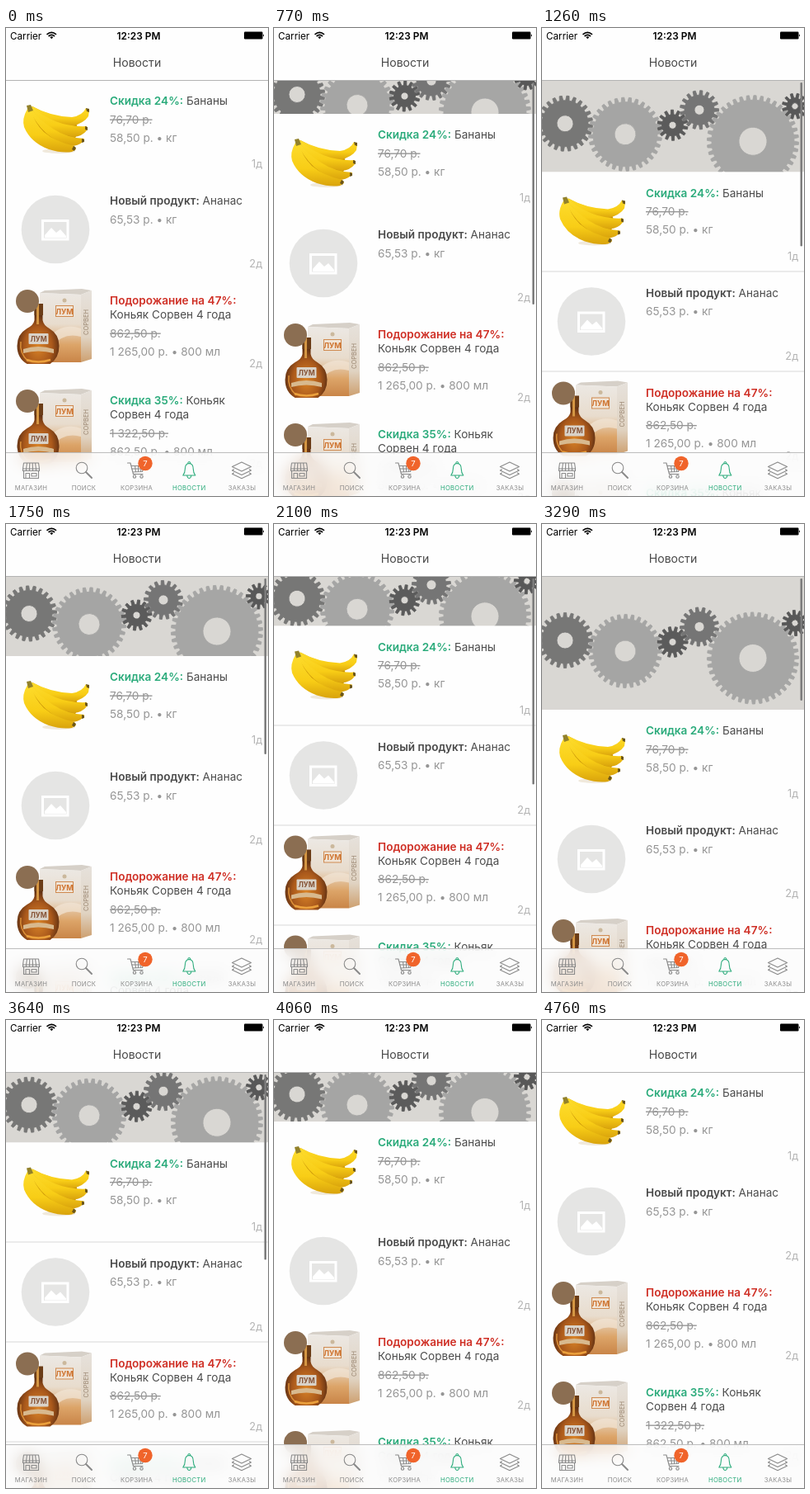
Write an HTML page that moves like this. It is 318 px wide and 567 px high and loops after 5180 ms.

```html
<!DOCTYPE html>
<html lang="ru">
<head>
<meta charset="utf-8">
<title>Новости</title>
<style>
  html, body { margin: 0; width: 100%; height: 100%; overflow: hidden; background: #fefefe; }
  #stage { position: relative; width: 318px; height: 567px; overflow: hidden; background: #fefefe; }
  svg { position: absolute; left: 0; top: 0; }
  svg text { font-family: Inter, Roboto, sans-serif; }
  #tabs {
    position: absolute; left: 0; top: 515px; width: 318px; height: 52px;
    background: rgba(252, 252, 252, .8);
    -webkit-backdrop-filter: blur(9px); backdrop-filter: blur(9px);
  }
  .line { font-size: 13.6px; fill: #4c4c4c; }
  .head { font-weight: 600; }
  .price { font-size: 13.65px; fill: #959595; }
  .old { text-decoration: line-through; }
  .age { font-size: 12.8px; fill: #b4b4b4; text-anchor: end; }
  .icon { fill: none; stroke: #8a8a8a; stroke-width: 1.1; stroke-linejoin: round; stroke-linecap: round; }
  .tab { font-size: 7.7px; letter-spacing: .25px; fill: #8c8c8c; text-anchor: middle; }
  .on { stroke: #2bab7b; }
  .tab.on { stroke: none; fill: #2bab7b; }
</style>
</head>
<body>
<div id="stage">
  <svg width="318" height="567" viewBox="0 0 318 567">
    <defs>
      <clipPath id="pullClip"><rect id="pullArea" y="63" width="318" height="0"/></clipPath>
      <linearGradient id="carton" x1="0" y1="0" x2="0" y2="1">
        <stop offset="0" stop-color="#ece8e3"/><stop offset=".45" stop-color="#e8dccd"/>
        <stop offset=".75" stop-color="#dca468"/><stop offset="1" stop-color="#c98548"/>
      </linearGradient>
      <linearGradient id="side" x1="0" y1="0" x2="0" y2="1">
        <stop offset="0" stop-color="#e6e1db"/><stop offset=".65" stop-color="#e0d3c2"/><stop offset="1" stop-color="#cda070"/>
      </linearGradient>
      <radialGradient id="amber" cx=".5" cy=".7" r=".6">
        <stop offset="0" stop-color="#d98428"/><stop offset=".55" stop-color="#a9581b"/><stop offset="1" stop-color="#42200f"/>
      </radialGradient>
      <linearGradient id="peel" x1="0" y1="0" x2="0" y2="1">
        <stop offset="0" stop-color="#fddc2c"/><stop offset=".6" stop-color="#f8cd16"/><stop offset="1" stop-color="#d9a30c"/>
      </linearGradient>

      <g id="bananas">
        <ellipse cx="64" cy="85" rx="20" ry="3" fill="#f0e9dc"/>
        <path d="M29 33Q26 56 40 70L78 80L88 62L84 46Q54 44 32 31Z" fill="#c99408"/>
        <g fill="url(#peel)">
          <path d="M30 32Q50 52 80 55Q95 51 100 43L101 36L97 33Q93 42 80 44Q54 43 32 31Z"/>
          <path d="M30 33Q50 62 82 68Q93 67 98 60L98 55Q78 56 60 49Q42 41 32 33Z"/>
          <path d="M28 34Q44 70 78 79Q88 79 93 74L95 70Q74 69 57 58Q40 47 31 34Z"/>
          <path d="M26 34Q19 46 22 56Q30 75 52 83Q68 88 80 86L85 83L83 79Q60 74 46 62Q34 50 31 36Z"/>
        </g>
        <path d="M25 30L30 29L33 36L27 38Z" fill="#92812a"/>
        <path d="M97 33l4 1v4l-3-1zM96 55l3 1v4l-3-1zM92 70l3 1v3l-3 1zM82 79l3 2l-2 4l-3-2z" fill="#6b561b"/>
      </g>

      <g id="blank">
        <circle cx="60" cy="59" r="41.3" fill="#e5e5e4"/>
        <rect x="44.5" y="48.5" width="30.5" height="22.5" fill="none" stroke="#fff" stroke-width="3"/>
        <path d="M47 69v-3l8-9l6 6l5-4l7 8v2z" fill="#fff"/>
      </g>

      <g id="cognac">
        <path d="M41 15L47 12L92 10L104 12L91 17Z" fill="#d6d0c8"/>
        <path d="M41 15L91 17V99H41Z" fill="url(#carton)"/>
        <path d="M91 17L104 12V95L91 99Z" fill="url(#side)"/>
        <path d="M50 72Q66 50 91 58V68Q70 62 56 80Z" fill="#f3e6d6" opacity=".7"/>
        <circle cx="71" cy="24" r="2.500" fill="#cbb89c"/>
        <rect x="60.500" y="30.500" width="21" height="13" fill="#f0e4d6" stroke="#cf8a50"/>
        <text x="71" y="40.500" text-anchor="middle" font-size="9" font-weight="700" fill="#cf7430">ЛУМ</text>
        <text transform="translate(100 66) rotate(-90)" font-size="7.500" fill="#998570">СОРВЕН</text>
        <path d="M34.500 29h10v19q1 6 8 10q12 7 12 21q0 15-11 22H25.500q-12-7-12-22q0-14 12-21q8-4 9-10z" fill="url(#amber)"/>
        <path d="M34.500 28h10.500v14h-10.500z" fill="#6b3d18"/>
        <path d="M37 28h3v25h-3z" fill="#d49643"/>
        <path d="M18 74Q16 88 27 98" fill="none" stroke="#dc9038" stroke-width="1.500"/>
        <rect x="27.500" y="64" width="24" height="13" rx="1" fill="#d9d2c8"/>
        <text x="39.500" y="73.500" text-anchor="middle" font-size="8.500" font-weight="700" fill="#865336">ЛУМ</text>
        <path d="M21 83Q39 77 58 83V88Q39 83 21 88Z" fill="#d8b98e"/>
        <path d="M25 96Q39 101 54 96" fill="none" stroke="#eba03c" stroke-width="2.500"/>
        <circle cx="26" cy="25" r="14" fill="#8b6e52"/>
      </g>
    </defs>

    <g clip-path="url(#pullClip)">
      <rect y="63" width="318" height="260" fill="#d9d7d3"/>
      <g id="gears"></g>
    </g>
    <g id="list"></g>
    <rect id="thumb" x="313.500" y="66" width="2.500" height="300" rx="1.250" fill="#7c7c7c"/>
  </svg>

  <div id="tabs"></div>

  <svg width="318" height="567" viewBox="0 0 318 567">
    <rect width="318" height="63" fill="#fefefe"/>
    <rect y="63" width="318" height="1" fill="#b3b3b3"/>
    <text x="5" y="13.500" font-size="11.700">Carrier</text>
    <g fill="none" stroke="#000" stroke-width="1.700">
      <path d="M49.500 7.800Q55.300 2.800 61 7.800M51.600 10Q55.300 6.900 59 10"/>
      <path d="M53.300 11.100Q55.300 9.600 57.300 11.100L55.300 13.200Z" fill="#000" stroke="none"/>
    </g>
    <text x="161" y="13.500" font-size="11.900" font-weight="600" text-anchor="middle">12:23 PM</text>
    <rect x="289" y="4.500" width="22.500" height="9" rx="1.200"/>
    <path d="M312 7.500Q314 9 312 10.500Z"/>
    <text x="159" y="47" font-size="14.100" fill="#4a4a4a" text-anchor="middle">Новости</text>

    <rect y="514" width="318" height="1" fill="#bdbdbd"/>
    <g class="icon">
      <path d="M21.500 527H39.500L40.500 534H20.500ZM20.500 534v2.500h4v-2.500v2.500h4v-2.500v2.500h4v-2.500v2.500h4v-2.500v2.500h4v-2.500M25.500 527l-1 7M28.800 527l-.3 7M32.200 527l.3 7M35.500 527l1 7M21.500 536.500V545.500H39.500V536.500M24 545.500v-6h4.500v6M31 539.500h6v3.500h-6z"/>
      <circle cx="92" cy="533" r="6.800"/>
      <path d="M97 538L104 545" stroke-width="2"/>
      <path d="M147.500 527H151L154.500 540.500H166M152 530.500H168L165.500 537.500L154 538M156.500 530.500l1 7M160.500 530.500v7M164.500 530.500l-1 7M152.500 534H166.500"/>
      <circle cx="156" cy="543.500" r="1.700"/><circle cx="164.500" cy="543.500" r="1.700"/>
      <path class="on" d="M222.300 527.500q-5 .3-5 7q0 4.500-2.500 7.500H229.800q-2.500-3-2.500-7.500q0-6.700-5-7zM220.800 527.500q0-2 1.500-2t1.500 2M219.800 542.500q.5 3 2.500 3t2.500-3"/>
      <path d="M286 526L297.500 531.500L286 537L274.500 531.500ZM276.500 534.800L274.500 536L286 541.500L297.500 536L295.500 534.800M276.500 539L274.500 540.200L286 545.700L297.500 540.200L295.500 539"/>
    </g>
    <circle cx="169" cy="527.500" r="8.700" fill="#f0642b"/>
    <text x="169" y="531" font-size="9.500" fill="#fff" text-anchor="middle">7</text>
    <text class="tab" x="30.500" y="559.500">МАГАЗИН</text>
    <text class="tab" x="94.500" y="559.500">ПОИСК</text>
    <text class="tab" x="158.500" y="559.500">КОРЗИНА</text>
    <text class="tab on" x="222.300" y="559.500">НОВОСТИ</text>
    <text class="tab" x="286.500" y="559.500">ЗАКАЗЫ</text>
  </svg>
</div>

<script>
const LOOP = 5180, STEP = 70, TOP = 63, ROW = 121;
const GREEN = '#2bab7b', RED = '#cf2f25', DARK = '#4a4a4a';
const $ = id => document.getElementById(id);

const news = [
  { pic: 'bananas', head: 'Скидка 24%:', color: GREEN, text: 'Бананы', old: '76,70 р.', price: '58,50 р. • кг', age: '1д' },
  { pic: 'blank', head: 'Новый продукт:', color: DARK, text: 'Ананас', price: '65,53 р. • кг', age: '2д' },
  { pic: 'cognac', head: 'Подорожание на 47%:', color: RED, text: '', more: 'Коньяк Сорвен 4 года', old: '862,50 р.', price: '1 265,00 р. • 800 мл', age: '2д' },
  { pic: 'cognac', head: 'Скидка 35%:', color: GREEN, text: 'Коньяк', more: 'Сорвен 4 года', old: '1 322,50 р.', price: '862,50 р. • 800 мл', age: '2д' }
];

function rowMarkup(item, i) {
  let y = 29;
  const line = (cls, s) => `<text class="${cls}" x="126" y="${y}">${s}</text>`;
  let out = `<use href="#${item.pic}"/>` +
    line('line', `<tspan class="head" fill="${item.color}">${item.head}</tspan> ${item.text}`);
  if (item.more) { y += 17; out += line('line', item.more); }
  y += 22.5;
  if (item.old) { out += line('price old', item.old); y += 22; }
  out += line('price', item.price);
  out += `<text class="age" x="311" y="105">${item.age}</text>`;
  return `<g transform="translate(0 ${64 + i * ROW})">${out}</g>`;
}

const separators = news.map((_, i) =>
  `<rect y="${183 + i * ROW}" width="318" height="1" fill="#dadada"/>`).join('');
$('list').innerHTML = `<rect y="${TOP}" width="318" height="520" fill="#fefefe"/>` +
  news.map(rowMarkup).join('') + `<g id="seps">${separators}</g>`;

// x, y, outer radius, teeth, hole radius, colour
const gears = [
  [28, 60, 34, 24, 10, '#777776'],
  [101, 73, 45, 32, 13, '#a5a5a4'],
  [158.5, 62, 19, 14, 4.5, '#5b5b5b'],
  [191, 43.5, 24, 17, 6, '#757575'],
  [256, 81.5, 56, 40, 17, '#a6a6a5'],
  [307, 39, 16, 12, 4, '#585858']
];

function gearPath(r, teeth, hole) {
  const pitch = 2 * Math.PI / teeth, pts = [];
  for (let i = 0; i < teeth; i++) {
    for (const [k, rad] of [[-.3, r - 6], [-.18, r - .4], [.18, r - .4], [.3, r - 6]]) {
      const a = (i + k) * pitch;
      pts.push((rad * Math.cos(a)).toFixed(2) + ' ' + (rad * Math.sin(a)).toFixed(2));
    }
  }
  return `M${pts.join('L')}ZM${hole} 0A${hole} ${hole} 0 1 0 ${-hole} 0A${hole} ${hole} 0 1 0 ${hole} 0Z`;
}

$('gears').innerHTML = gears.map(([, , r, n, hole, c]) =>
  `<path d="${gearPath(r, n, hole)}" fill="${c}" stroke="${c}" stroke-width=".8" stroke-linejoin="round" fill-rule="evenodd"/>`).join('');
const wheels = [...$('gears').children];

const inOut = p => .5 - .5 * Math.cos(Math.PI * p);
const outSine = p => Math.sin(Math.PI * p / 2);
const outQuad = p => 1 - (1 - p) ** 2;
const outCubic = p => 1 - (1 - p) ** 3;
const drag = p => (inOut(p) + outSine(p)) / 2;

// start, end, from, to, easing
const pulls = [
  [630, 1050, 0, 109, drag],
  [1190, 1400, 109, 113.5, outQuad],
  [1540, 2100, 113.5, 60.5, inOut],
  [2310, 3430, 60.5, 165, drag],
  [3430, 3990, 165, 60, outCubic],
  [4480, 4760, 60, 0, inOut]
];

function pullAt(t) {
  let value = 0;
  for (const [start, end, from, to, ease] of pulls) {
    if (t < start) break;
    value = from + (to - from) * ease(Math.min(1, (t - start) / (end - start)));
  }
  return Math.round(value * 2) / 2;
}

function turnGears(angle, pull) {
  gears.forEach(([x, y, , n], i) => {
    if (i) {
      // a tooth of the previous wheel meets a gap of this one
      const [px, py, , pn] = gears[i - 1];
      const dir = Math.atan2(y - py, x - px);
      angle = dir + Math.PI - (Math.PI - pn * (dir - angle)) / n;
    }
    wheels[i].setAttribute('transform',
      `translate(${x} ${y + pull / 2}) rotate(${angle * 180 / Math.PI})`);
  });
}

function draw(time) {
  const t = Math.floor(time % LOOP / STEP) * STEP;
  const pull = pullAt(t);
  const spin = Math.max(0, t - 3430) * .0025;
  $('pullArea').setAttribute('height', pull);
  $('list').setAttribute('transform', `translate(0 ${pull})`);
  // hairlines only land on the pixel grid at half offsets
  $('seps').setAttribute('opacity', pull % 1 ? 1 : 0);
  $('thumb').setAttribute('height', 310 - pull);
  $('thumb').setAttribute('opacity', t < 700 ? 0 : Math.max(0, Math.min(1, (3990 - t) / 280)));
  turnGears(pull * Math.PI / 108 + spin, pull);
}

const begin = performance.now();
(function tick() {
  draw(performance.now() - begin);
  requestAnimationFrame(tick);
})();
</script>
</body>
</html>
```
